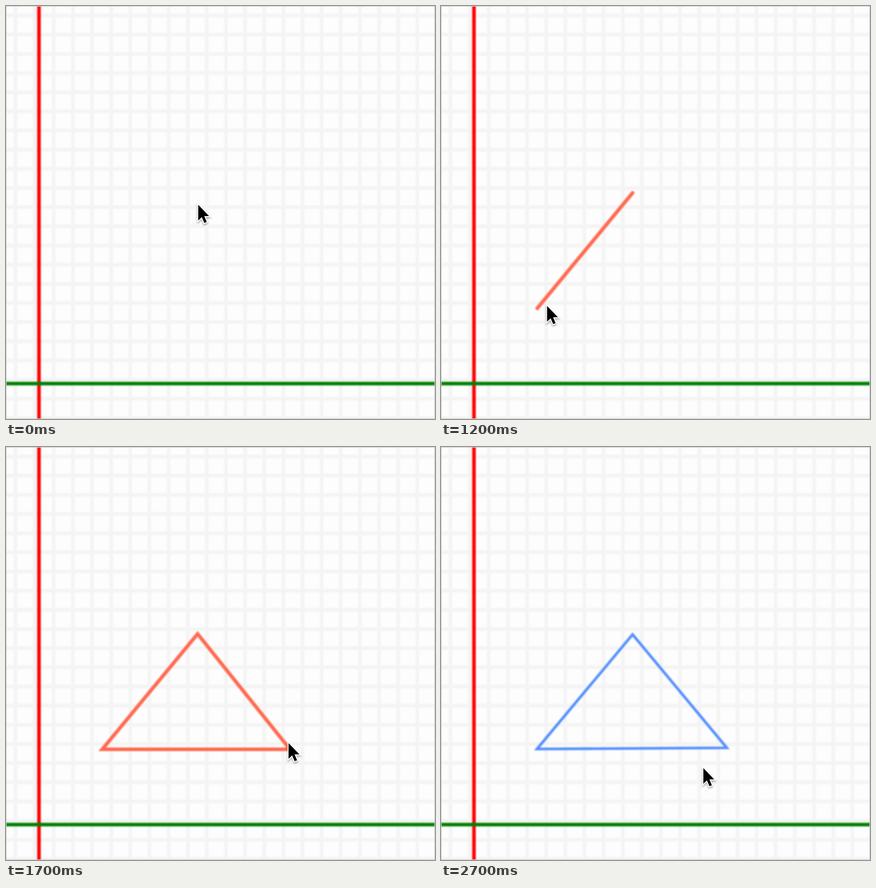
Write an HTML page that moves like this. It is 722 px wide and 694 px high and loops after 2.8 s.

```html
<!DOCTYPE html>
<html lang="en">
<head>
<meta charset="utf-8">
<title>Drawing a triangle</title>
<style>
  html, body { margin: 0; width: 100%; height: 100%; overflow: hidden; background: #fdfdfd; }
  svg { display: block; width: 722px; height: 694px; }
  path { fill: none; stroke-width: 6; }
  .canvas { filter: blur(.8px); }
  #grid { stroke: #f4f4f4; }
  .x { stroke: #008000; }
  .y { stroke: #f00; }
  #shape { stroke: #ff6a50; stroke-linecap: round; stroke-miterlimit: 6; }
  #shape.done { stroke: #5590ff; stroke-width: 4.6; }
  #cursor { filter: drop-shadow(0 2px 1.5px rgba(0, 0, 0, .35)); }
  #cursor path { fill: #000; stroke: #fff; stroke-width: 3.4; paint-order: stroke; }
</style>
</head>
<body>
<svg viewBox="0 0 722 694">
  <g class="canvas">
    <path id="grid"/>
    <path class="y" d="M55.5 -9V703"/>
    <path class="x" d="M-9 634.5H731"/>
    <path id="shape"/>
  </g>
  <rect x=".5" y=".5" width="721" height="693" fill="none" stroke="#ccc"/>
  <g id="cursor"><path d="M0 0V26.5L6 20.8L10.3 30.6L14.4 28.9L10.2 19H18.3Z"/></g>
</svg>
<script>
const LOOP = 2800, STEP = 100, DONE = 1900;
const LAG = 14, PEN_DROP = 11;

// cursor route: time, x, y
const route = [
  [0, 323.5, 334], [300, 320, 312], [500, 320, 312], [800, 148.5, 490],
  [1100, 160, 497], [1200, 178.5, 504], [1400, 430.5, 510.5], [1500, 461, 533],
  [1700, 475.5, 497.5], [2000, 476.5, 498.5], [2150, 475, 508],
  [2300, 476, 495], [2700, 441.5, 539.5]
];

// clicked corners: time, x, y
const corners = [[500, 322.5, 314], [1200, 162, 508], [1700, 478, 508]];
const finished = [[322.5, 315], [161.5, 507.5], [481, 505.5]];

function cursorAt(t) {
  const i = Math.max(1, route.findIndex(key => key[0] >= t));
  const [t0, x0, y0] = route[i - 1], [t1, x1, y1] = route[i];
  const k = (t - t0) / (t1 - t0);
  return [x0 + (x1 - x0) * k, y0 + (y1 - y0) * k];
}

// placed corners, then the pen trailing the cursor
function pointsAt(t) {
  if (t >= DONE) return finished;
  const placed = corners.filter(c => c[0] <= t);
  const points = placed.map(([, x, y]) => [x, y]);
  if (placed.length && placed.length < 3 && t > placed.at(-1)[0]) {
    const [x, y] = cursorAt(t - LAG);
    points.push([x, y + PEN_DROP]);
  }
  return points;
}

const toPath = pts => pts.length ? "M" + pts.join("L") + (pts.length > 2 ? "Z" : "") : "";

const grid = document.getElementById("grid");
const shape = document.getElementById("shape");
const cursor = document.getElementById("cursor");

let lines = "";
for (let p = 16; p < 722; p += 32.2) lines += `M${p} -9V703M-9 ${p}H731`;
grid.setAttribute("d", lines);

function draw() {
  const t = Math.floor(performance.now() % LOOP / STEP) * STEP;
  cursor.setAttribute("transform", `translate(${cursorAt(t)})`);
  shape.setAttribute("d", toPath(pointsAt(t)));
  shape.classList.toggle("done", t >= DONE);
  requestAnimationFrame(draw);
}
draw();
</script>
</body>
</html>
```
